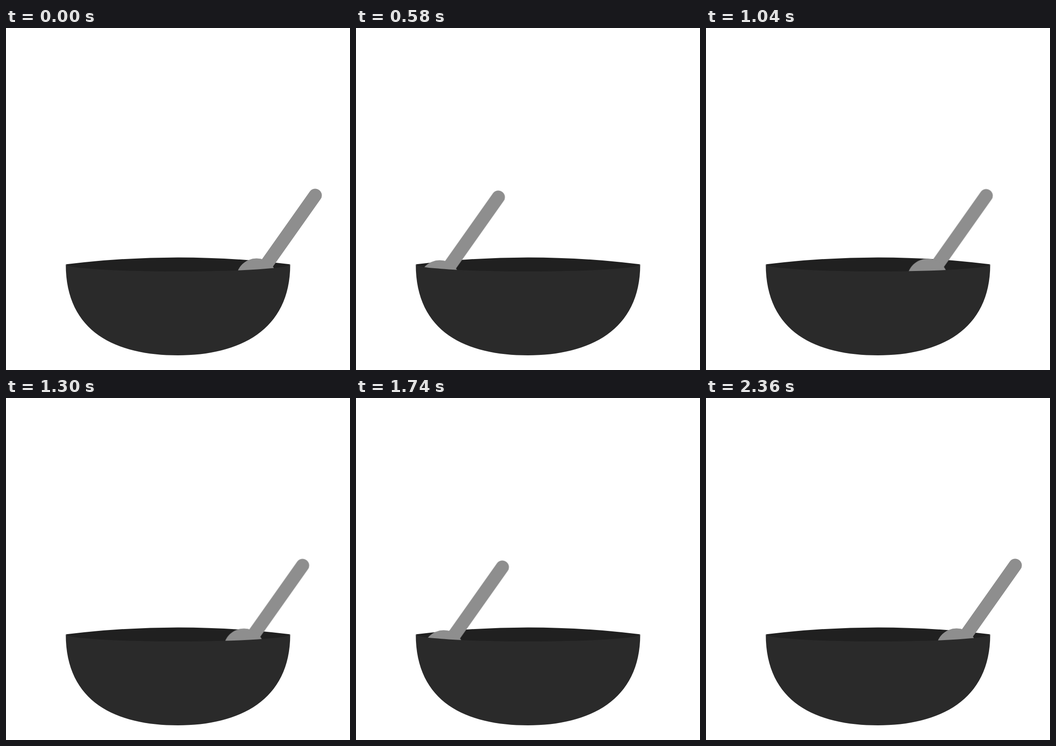
An HTML page for the animation above (2380 ms loop, 751x746 px).

```html
<!DOCTYPE html>
<html lang="en">
<head>
<meta charset="utf-8">
<title>Stirring bowl</title>
<style>
  html, body { margin: 0; width: 100%; height: 100%; overflow: hidden; background: #fff; }
  svg { display: block; width: 751px; height: 746px; }
</style>
</head>
<body>
<svg viewBox="0 0 751 746">
  <!-- inside of the bowl; its lower part lies behind the front wall -->
  <path fill="#202020" d="M130.5 515.5A2008 2008 0 0 1 620.5 515.5L590 545H161Z"/>
  <g id="sweep">
    <!-- the origin is the centre of the handle's round end -->
    <g id="dip" fill="#8e8e8e">
      <path d="M0 0L-128 181" stroke="#8e8e8e" stroke-width="29" stroke-linecap="round"/>
      <circle cx="-128" cy="182" r="44.5"/>
    </g>
  </g>
  <path fill="#2a2a2a" d="M130.5 515.5A245 15.5 0 0 0 620.5 515.5
    C620.5 660 509 714 375.5 714C241 714 130.5 664 130.5 515.5Z"/>
</svg>
<script>
  const LOOP = 2380;
  const SMOOTH = 'cubic-bezier(.3333, 0, .6667, 1)';
  const LATE = 'cubic-bezier(.42, 0, .6667, 1)';
  const RIGHT = [675, 365], LEFT = [309.5, 369];

  // steps: [time in ms, [x, y], easing to the next step]
  function play(id, steps) {
    const frames = steps.map(([ms, [x, y], easing = 'linear']) => ({
      offset: ms / LOOP, transform: `translate(${x}px, ${y}px)`, easing
    }));
    document.getElementById(id).animate(frames, { duration: LOOP, iterations: Infinity }).startTime = 0;
  }

  play('sweep', [
    [0, RIGHT, SMOOTH],
    [600, LEFT, SMOOTH],
    [1200, RIGHT, SMOOTH],
    [1800, LEFT, LATE],
    [2360, RIGHT],
    [LOOP, RIGHT]
  ]);

  // the last stroke sags below the straight line
  play('dip', [
    [0, [0, 0]],
    [1800, [0, 0], 'ease-out'],
    [2090, [0, 6], 'ease-in'],
    [2360, [0, 0]],
    [LOOP, [0, 0]]
  ]);
</script>
</body>
</html>
```
